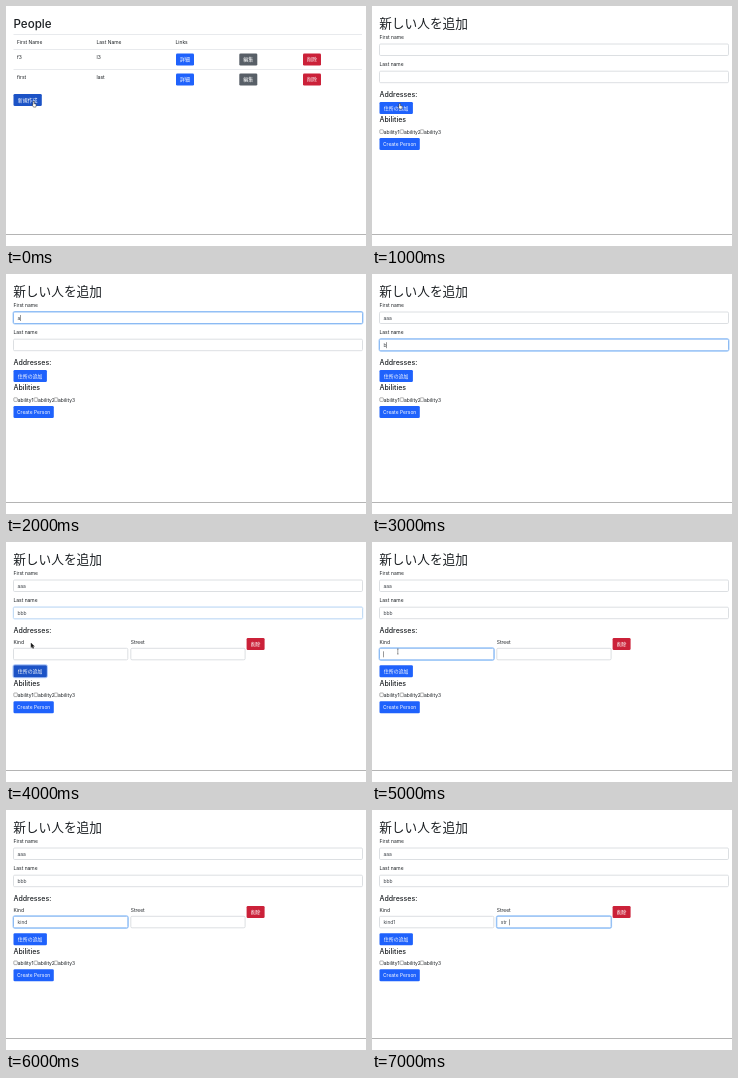
These frames come from a looping animation (360 by 240 pixels, 8 s). An HTML page:

```html
<!DOCTYPE html>
<html lang="ja">
<head>
<meta charset="utf-8">
<title>People</title>
<style>
  html, body { margin: 0; width: 100%; height: 100%; overflow: hidden; background: #fff; }
  svg { display: block; width: 360px; height: 240px; font: 4.95px Inter, "Noto Sans CJK JP", "Noto Sans CJK", sans-serif; fill: #1c2024; }
</style>
</head>
<body>
<svg id="stage" viewBox="0 0 360 240"></svg>
<script>
const BLUE = '#1f62fc', DARK_BLUE = '#1c53c6', GRAY = '#585f67', RED = '#cb2139';
const STEP = 1000;

const text = (x, y, s, attrs = '') => `<text x="${x}" y="${y}" ${attrs}>${s}</text>`;
const rect = (x, y, w, h, attrs) => `<rect x="${x}" y="${y}" width="${w}" height="${h}" ${attrs}/>`;
const heading = (y, s) => text(7.5, y, s, 'font-size="7" font-weight="500"');

function button(x, y, w, label, color, focused) {
  const ring = focused ? rect(x - .5, y - .5, w + 1, 13, 'rx="1.7" fill="none" stroke="#a9c6fb"') : '';
  return ring + rect(x, y, w, 12, `rx="1.3" fill="${color}"`) +
    text(x + w / 2, y + 7.8, label, 'fill="#fff" text-anchor="middle"');
}

// focus: 0 = idle, 1 = focused, .3 = focus fading out
function input(x, y, w, value, focus = 0, caret = false) {
  const ring = focus ? rect(x - .5, y - .5, w + 1, 12.5, `rx="1.6" fill="none" stroke="#a6cdfa" opacity="${focus}"`) : '';
  const border = focus === 1 ? '#75acf0' : focus ? '#b5d3f2' : '#d3d7db';
  const caretX = x + 4 + value.length * 2.85;
  return ring + rect(x, y, w, 11.5, `rx="1.2" fill="#fff" stroke="${border}" stroke-width=".8"`) +
    text(x + 4, y + 7.6, value, 'fill="#40464c"') +
    (caret ? rect(caretX, y + 3, .5, 6, 'fill="#333"') : '');
}

const pointers = {
  hand: 'M1 0v3l-1 0 1.5 2.6h2.3l.6-2.8-2-.6V0z',
  arrow: 'M0 0v4.6l1.1-1 .8 1.8.8-.4-.8-1.7h1.5z',
  beam: 'M0 0h1.6M.8 0v5M0 5h1.6'
};
function pointer([kind, x, y]) {
  const paint = kind === 'hand' ? 'fill="#fff" stroke="#222"' : 'fill="#111" stroke="#444"';
  return `<path transform="translate(${x} ${y})" d="${pointers[kind]}" ${paint} stroke-width=".5"/>`;
}

function listPage() {
  const line = y => rect(7.5, y, 348.5, .6, 'fill="#d9dde1"');
  const row = (y, first, last) => line(y) + text(11, y + 10, first) + text(90.5, y + 10, last) +
    button(170, y + 4.3, 18, '詳細', BLUE) + button(233.3, y + 4.3, 18, '編集', GRAY) +
    button(297, y + 4.3, 18, '削除', RED);
  return text(7.5, 22, 'People', 'font-size="11.6" font-weight="500"') + line(28) +
    text(11, 37.6, 'First Name') + text(90.5, 37.6, 'Last Name') + text(169.5, 37.6, 'Links') +
    row(43.2, 'f3', 'l3') + row(63.2, 'first', 'last') +
    button(7.5, 88, 28.3, '新規作成', DARK_BLUE);
}

function formPage({ first = '', last = '', address, focus, fading, caret, pressed }) {
  const field = (name, x, y, w, value) =>
    input(x, y, w, value, focus === name ? 1 : fading === name ? .3 : 0, focus === name && caret);
  const dy = address ? 27.2 : 0;
  let out = text(7.2, 22.3, '新しい人を追加', 'font-size="12.7"') +
    text(7.5, 33.2, 'First name') + field('first', 7.5, 38, 349, first) +
    text(7.5, 60.4, 'Last name') + field('last', 7.5, 65.2, 349, last) + heading(90.6, 'Addresses:');
  if (address) {
    out += text(7.5, 101.6, 'Kind') + field('kind', 7.5, 106.3, 114.3, address[0]) +
      text(124.8, 101.6, 'Street') + field('street', 124.8, 106.3, 114.3, address[1]) +
      button(240.6, 96, 18, '削除', RED);
  }
  out += button(7.5, 96 + dy, 33.4, '住所の追加', pressed ? DARK_BLUE : BLUE, pressed) + heading(116.4 + dy, 'Abilities');
  [7.8, 28.1, 48.2].forEach((x, i) => {
    out += rect(x, 123.8 + dy, 3.6, 3.6, 'rx=".6" fill="#fff" stroke="#666" stroke-width=".5"') +
      text(x + 3.9, 127.5 + dy, 'ability' + (i + 1));
  });
  return out + button(7.5, 132 + dy, 40.3, 'Create Person', BLUE);
}

const named = { first: 'aaa', last: 'bbb' };
const scenes = [
  { list: true, mouse: ['hand', 26, 95.5] },
  { mouse: ['hand', 26, 97.5] },
  { first: 'a', focus: 'first', caret: true },
  { first: 'aaa', last: 'b', focus: 'last', caret: true },
  { ...named, address: ['', ''], fading: 'last', pressed: true, mouse: ['arrow', 25, 101] },
  { ...named, address: ['', ''], focus: 'kind', caret: true, mouse: ['beam', 25, 107] },
  { ...named, address: ['kind', ''], focus: 'kind' },
  { ...named, address: ['kind1', 'str'], focus: 'street', caret: true }
];

const stage = document.getElementById('stage');
let shown = -1;
function tick() {
  const index = Math.floor(performance.now() / STEP) % scenes.length;
  if (index !== shown) {
    const scene = scenes[shown = index];
    stage.innerHTML = (scene.list ? listPage() : formPage(scene)) +
      (scene.mouse ? pointer(scene.mouse) : '') + rect(0, 228, 360, 1, 'fill="#b4b4b4"');
  }
  requestAnimationFrame(tick);
}
tick();
</script>
</body>
</html>
```
